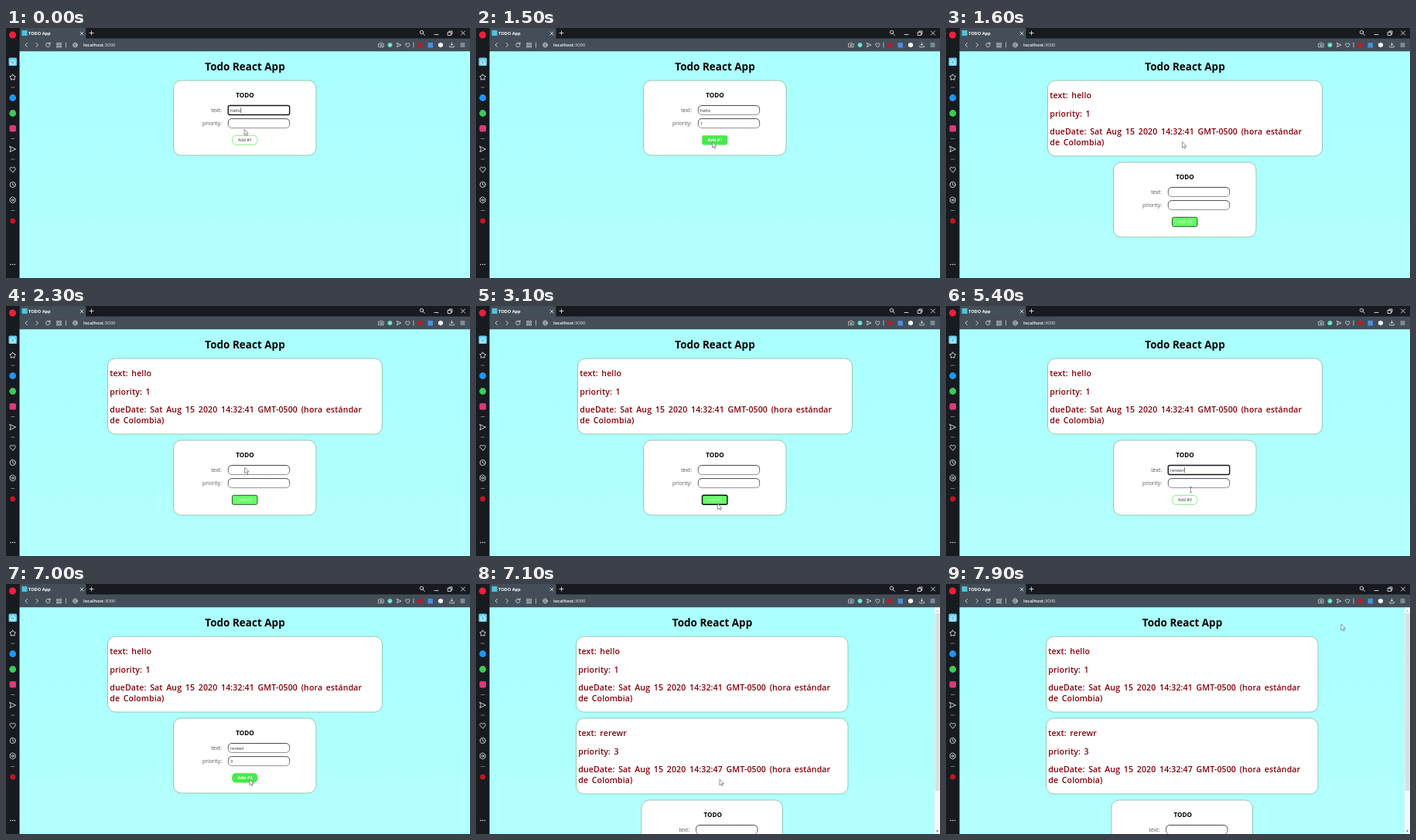
Animation of 600x324 px, one loop 8000 ms. Source, as an HTML page:

```html
<!DOCTYPE html>
<html lang="en">
<head>
<meta charset="utf-8">
<title>Todo React App</title>
<style>
  html, body { margin: 0; width: 100%; height: 100%; overflow: hidden; }
  svg { display: block; width: 600px; height: 324px; font-family: "Open Sans", "Noto Sans", sans-serif; }
  .icon { fill: none; stroke: #dde1e5; stroke-width: .9; stroke-linecap: round; stroke-linejoin: round; }
  .title { font-weight: 700; font-size: 13.5px; text-anchor: middle; }
  .label { font-size: 6.8px; fill: #555; text-anchor: end; }
  .value { font-size: 5.8px; fill: #333; }
  .item { font-family: "Comic Sans MS", "Open Sans", "Noto Sans", sans-serif; font-size: 10.6px; font-weight: 600;
          fill: #850008; word-spacing: 1.8px; letter-spacing: .1px; }
  .panel { fill: #fff; stroke: #8fc4a4; stroke-width: .9; }
</style>
</head>
<body>
<svg viewBox="0 0 600 324">
  <defs>
    <linearGradient id="sky" x2="0" y2="1">
      <stop stop-color="#aaffff"/><stop offset="1" stop-color="#b3ffff"/>
    </linearGradient>
    <linearGradient id="inset" x2="0" y2="1">
      <stop offset=".2" stop-color="#33343c"/><stop offset="1" stop-color="#85868c"/>
    </linearGradient>
  </defs>
  <rect width="600" height="324" fill="url(#sky)"/>

  <g id="page">
    <text id="heading" class="title" y="55">Todo React App</text>
    <g id="cards"></g>
    <g id="form">
      <rect id="formPanel" class="panel" x="216.5" y="68" height="97" rx="10"/>
      <text class="title" x="309" y="90" style="font-size:8.2px">TODO</text>
      <text class="label" x="279" y="108.5">text:</text>
      <text class="label" x="279" y="125.7">priority:</text>
      <g id="fields"></g>
      <rect id="button"/>
      <text id="buttonText" x="309" y="147.2" font-size="5.6" text-anchor="middle"></text>
    </g>
  </g>

  <g id="scrollbar">
    <rect x="593" y="30" width="7" height="294" fill="#f8f8f8"/>
    <rect x="593.5" y="38" width="6" height="230" fill="#dedfdf"/>
    <path d="M595 35.5l1.5-2 1.5 2z" fill="#bbb"/>
    <path d="M595 319.5l1.5 2 1.5-2z" fill="#555"/>
  </g>

  <!-- browser frame -->
  <rect width="600" height="14" fill="#171b20"/>
  <rect x="17" y="13.5" width="583" height="16.7" fill="#434e59"/>
  <path d="M17.5 14V1.5q0-1.5 1.5-1.5h83q1.500 0 1.5 1.5V14z" fill="#434e59"/>
  <rect width="17.5" height="324" fill="#171b20"/>
  <rect x="20.5" y="3" width="7" height="7" fill="#4cc4dc"/>
  <g fill="#fff">
    <text x="29" y="8.8" font-size="5.6" font-weight="700">TODO App</text>
    <text x="100" y="24.3" font-size="6" font-weight="600">localhost<tspan fill="#e4e7ea" font-weight="400">:3000</tspan></text>
  </g>
  <g class="icon">
    <path d="M96 5l4 4m0-4l-4 4M108 6.5h5m-2.5-2.5v5"/>
    <circle cx="537.5" cy="5.5" r="2.2"/>
    <path d="M539.2 7.2l2.3 2.3M554 8.5h5M571.5 5.500h4v4h-4zM573 5.5V4h4v4h-1.5M588.5 4l5 5m0-5l-5 5"/>
    <path d="M27.5 19.5L25 22l2.5 2.5M39 19.5l2.5 2.5-2.5 2.5"/>
    <path d="M56.5 20.2A2.7 2.7 0 1 0 57 22.5M57 18.8v2h-2"/>
    <path d="M66 19.5h2v2h-2zM69.5 19.5h2v2h-2zM66 23h2v2h-2zM69.5 23h2v2h-2z" stroke-width=".7"/>
    <path d="M77.5 19v6M527 19v6" stroke-width=".7"/>
    <g stroke-width=".6"><circle cx="89.5" cy="22" r="3"/><ellipse cx="89.5" cy="22" rx="1.3" ry="3"/><path d="M86.5 22h6"/></g>
    <path d="M482 20.2h1.5l.7-1h1.8l.7 1h1.5v4.5H482z" stroke-width=".7"/><circle cx="485" cy="22.3" r="1.1" stroke-width=".7"/>
    <path d="M505.5 19.5l5.5 2.5-5.5 2.5 1-2.5z" stroke-width=".8"/>
    <path d="M519.3 24.8l-2.5-2.7c-1-2.2 1.6-3.3 2.5-1.5 .9-1.8 3.5-.7 2.5 1.5z" stroke-width=".8"/>
    <path d="M576.5 19v3.5m-1.5-1.5l1.5 1.5 1.5-1.5M573.8 23v1.8h5.5V23M588 20h5m-5 2h5m-5 2h5" stroke-width=".8"/>
  </g>
  <circle cx="496.5" cy="22" r="3" fill="#5ad7c0"/>
  <path d="M495 22l1.2 1.2 2-2.2" stroke="#fff" fill="none" stroke-width=".8"/>
  <circle cx="535.5" cy="22" r="3" fill="#c51824"/>
  <rect x="545.5" y="19" width="6.5" height="6.5" fill="#4c8edb"/>
  <path d="M562 18.8l3 1.5v3.5l-3 1.5-3-1.5v-3.5z" fill="#f4f4f4"/>

  <!-- sidebar -->
  <circle cx="8.5" cy="9" r="4.5" fill="#ef2038"/>
  <rect x="3.5" y="38.5" width="10.5" height="10.5" rx="1.5" fill="#62d0f4"/>
  <circle cx="8.7" cy="90.5" r="4.4" fill="#1e96f7"/>
  <circle cx="8.7" cy="110.5" r="4.4" fill="#3ccb58"/>
  <rect x="4.5" y="126" width="8.5" height="8.5" rx="2" fill="#d93a7c"/>
  <circle cx="8.7" cy="250" r="3.5" fill="#bd1723"/>
  <g class="icon">
    <path d="M6 46.500v-3.300l2.7-2.2 2.7 2.2v3.3z" stroke="#fff"/>
    <path id="star"/>
    <path d="M6.5 77h4.5M6.5 143.5h4.5M6.5 170h4.5M6.5 236.5h4.5" stroke="#8b929a" stroke-width=".8"/>
    <path d="M5 153.5l7.5 3.5-7.5 3.5 1.2-3.5z"/>
    <path d="M8.7 187l-3.3-3.5c-1.3-3 2.2-4.3 3.3-1.9 1.1-2.4 4.6-1.1 3.3 1.9z"/>
    <circle cx="8.7" cy="203" r="3.6"/><path d="M8.7 201v2.2l1.4 1"/>
    <path d="M8.7 219l3.4 2v4l-3.4 2-3.4-2v-4z"/><circle cx="8.7" cy="223" r="1.3"/>
  </g>
  <g fill="#dde1e5"><circle cx="6" cy="306.5" r=".8"/><circle cx="8.7" cy="306.5" r=".8"/><circle cx="11.4" cy="306.5" r=".8"/></g>

  <g id="pointer">
    <path id="arrow" d="M0 0v7.8l1.8-1.6 1.3 2.6 1.2-.6-1.2-2.5h2.4z" fill="#f4f8f8" stroke="#555" stroke-width=".6"/>
    <path id="beam" d="M-1.5-3.5h3M0-3.5v7M-1.5 3.5h3" fill="none" stroke="#666" stroke-width=".6"/>
  </g>
</svg>

<script>
const LOOP = 8000, STEP = 100;
const FIRST_ADD = 1600, SECOND_ADD = 7100;
const $ = id => document.getElementById(id);

function make(parent, tag, attrs, text = "") {
  const el = document.createElementNS("http://www.w3.org/2000/svg", tag);
  set(el, attrs);
  el.textContent = text;
  return parent.appendChild(el);
}
function set(el, attrs) {
  for (const name in attrs) el.setAttribute(name, attrs[name]);
}
const show = (el, on) => el.setAttribute("visibility", on ? "visible" : "hidden");
const within = (t, from, to) => t >= from && t < to;

const star = Array.from({ length: 10 }, (_, i) => {
  const a = i * Math.PI / 5, r = i % 2 ? 2.4 : 4;
  return (8.7 + r * Math.sin(a)).toFixed(2) + " " + (64 - r * Math.cos(a)).toFixed(2);
});
set($("star"), { d: `M${star.join("L")}z` });

function makeCard(index, text, priority, second) {
  const group = make($("cards"), "g", { transform: `translate(0 ${index * 106})` });
  const panel = make(group, "rect", { class: "panel", y: 68, height: 98, rx: 10 });
  const rows = [
    [91, `text: ${text}`],
    [114.5, `priority: ${priority}`],
    [137.5, `dueDate: Sat Aug 15 2020 14:32:${second} GMT-0500 (hora estándar`],
    [152, "de Colombia)"]
  ].map(([y, line]) => make(group, "text", { class: "item", y }, line));
  return { group, panel, rows };
}
const cards = [makeCard(0, "hello", 1, 41), makeCard(1, "rerewr", 3, 47)];

function makeField(y) {
  return {
    box: make($("fields"), "rect", { x: 287.3, y, width: 79.4, height: 12, fill: "#fff" }),
    text: make($("fields"), "text", { class: "value", x: 290, y: y + 8.2 }),
    caret: make($("fields"), "rect", { y: y + 2.5, width: .6, height: 7, fill: "#111" })
  };
}
const textField = makeField(100.5), priorityField = makeField(117.6);

function drawField(field, value, focused) {
  set(field.box, focused
    ? { rx: 2, stroke: "#15171f", "stroke-width": 1.4 }
    : { rx: 4.5, stroke: "url(#inset)", "stroke-width": .9 });
  field.text.textContent = value;
  show(field.caret, focused);
  const width = value ? field.text.getComputedTextLength() : 0;
  set(field.caret, { x: 290.3 + width });
}

const buttonStyles = {
  idle:    { fill: "#fff", stroke: "#82e882", line: .9, rx: 5, ink: "#333", weight: 400 },
  hover:   { fill: "#45ea48", stroke: "#66ee66", line: .6, rx: 4.5, ink: "#fff", weight: 700 },
  pressed: { fill: "#45ea48", stroke: "#66ee66", line: .6, rx: 2, ink: "#fff", weight: 700 },
  focus:   { fill: "#69fa69", stroke: "#30533a", line: 1, rx: 2, ink: "#d4ffd4", weight: 400 },
  focusHover: { fill: "#69fa69", stroke: "#07150a", line: 1.4, rx: 2, ink: "#c8ffc8", weight: 400 }
};
function buttonState(t) {
  if (within(t, 1200, 1400) || within(t, 6800, SECOND_ADD)) return "hover";
  if (within(t, 1400, FIRST_ADD)) return "pressed";
  if (within(t, FIRST_ADD, 2600) || t >= SECOND_ADD) return "focus";
  return within(t, 2600, 4300) ? "focusHover" : "idle";
}
function drawButton(t) {
  const s = buttonStyles[buttonState(t)];
  set($("button"), { x: 292.5, y: 139.3, width: 32.5, height: 12, rx: s.rx,
    fill: s.fill, stroke: s.stroke, "stroke-width": s.line });
  set($("buttonText"), { fill: s.ink, "font-weight": s.weight });
  $("buttonText").textContent = `Add #${1 + (t >= FIRST_ADD) + (t >= SECOND_ADD)}`;
}

// time, x, y
const path = [
  [0, 308, 131], [300, 312, 124], [600, 312, 124], [800, 309, 143], [900, 309, 143],
  [1200, 305.5, 147.5], [1800, 305.5, 147.5], [2700, 311, 253], [3100, 312.5, 256],
  [3600, 312, 258], [4200, 318, 214], [5100, 318, 214], [5400, 316.5, 238],
  [5600, 316, 231], [6500, 316, 231], [6900, 315, 253], [7300, 315, 253], [7900, 511, 52]
];
function pointerAt(t) {
  const next = path.findIndex(p => p[0] > t);
  if (next < 0) return path[path.length - 1].slice(1);
  const [t0, x0, y0] = path[next - 1], [t1, x1, y1] = path[next];
  const u = (t - t0) / (t1 - t0), k = u * u * (3 - 2 * u);
  return [x0 + (x1 - x0) * k, y0 + (y1 - y0) * k];
}

function draw(t) {
  const count = (t >= FIRST_ADD) + (t >= SECOND_ADD);
  const scrollable = count === 2;
  const left = scrollable ? 129.5 : 131.5;

  set($("heading"), { x: scrollable ? 305.5 : 309 });
  cards.forEach(({ group, panel, rows }, i) => {
    show(group, i < count);
    set(panel, { x: left, width: scrollable ? 351.5 : 355 });
    rows.forEach(row => set(row, { x: left + 2.7 }));
  });
  set($("form"), { transform: `translate(${scrollable ? -2.7 : 0} ${count * 106})` });
  set($("formPanel"), { width: scrollable ? 182.7 : 184.5 });
  show($("scrollbar"), scrollable);

  const typed = Math.max(0, Math.floor((t - 4500) / 100));
  const text = ["hello", "rerewr".slice(0, typed), ""][count];
  const priority = [t >= 800 ? "1" : "", t >= 6400 ? "3" : "", ""][count];
  drawField(textField, text, t < 400 || within(t, 4300, 5700));
  drawField(priorityField, priority, within(t, 400, 1400) || within(t, 5700, 6900));
  drawButton(t);

  const [x, y] = pointerAt(t);
  const overField = within(t, 100, 700) || within(t, 4000, 6700);
  set($("pointer"), { transform: `translate(${x} ${y})` });
  show($("arrow"), !overField);
  show($("beam"), overField);
}

const start = performance.now();
function tick() {
  const t = (performance.now() - start) % LOOP;
  draw(Math.floor(t / STEP) * STEP);
  requestAnimationFrame(tick);
}
tick();
</script>
</body>
</html>
```
